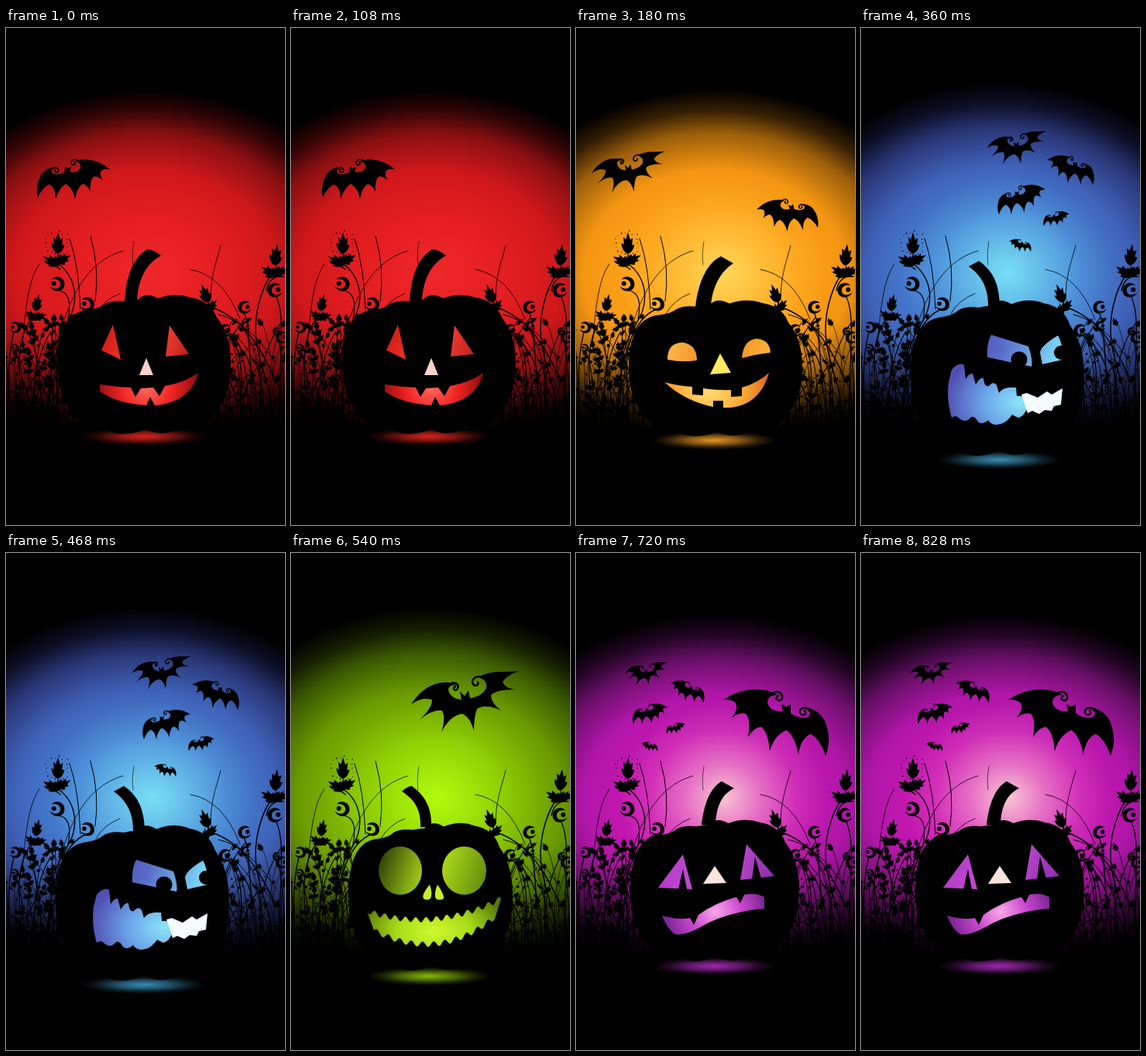
An HTML page that plays this animation: 360x640 px, repeating every 0.9 s.

```html
<!DOCTYPE html>
<html lang="en">
<head>
<meta charset="utf-8">
<title>Halloween lantern</title>
<style>
html, body { margin: 0; width: 100%; height: 100%; overflow: hidden; background: #000; }
svg { display: block; width: 100%; height: 100%; }
</style>
</head>
<body>
<svg id="stage" viewBox="0 0 360 640"></svg>
<script>
const HOLD = 180;
const stage = document.getElementById('stage');

let seed = 11;
const rnd = (a, b) => {
  seed = (seed * 16807) % 2147483647;
  return a + (b - a) * seed / 2147483647;
};
const fix = n => n.toFixed(1);
const fill = (d, f = '#000') => `<path d="${d}" fill="${f}"/>`;
const line = (d, w) => `<path d="${d}" fill="none" stroke="#000" stroke-width="${w}" stroke-linecap="round"/>`;
const dot = (x, y, r) => `<circle cx="${fix(x)}" cy="${fix(y)}" r="${fix(r)}"/>`;
const stops = list => list.map(([o, c, a = 1]) =>
  `<stop offset="${o}" stop-color="${c}" stop-opacity="${a}"/>`).join('');
const radial = (id, x, y, rx, ry, list) =>
  `<radialGradient id="${id}" gradientUnits="userSpaceOnUse" cx="0" cy="0" r="1" gradientTransform="translate(${x} ${y}) scale(${rx} ${ry})">${stops(list)}</radialGradient>`;
const linear = (id, x1, y1, x2, y2, list) =>
  `<linearGradient id="${id}" gradientUnits="userSpaceOnUse" x1="${x1}" y1="${y1}" x2="${x2}" y2="${y2}">${stops(list)}</linearGradient>`;

// ---- plants ----
const LEAF = 'M0 0Q-.9 -.12 -1 -.5L-.6 -.45L-.7 -.78L-.3 -.68L0 -1L.35 -.66L.75 -.74L.62 -.42L1 -.42Q.8 -.1 0 0Z';
const leaf = (x, y, len, ang, w) =>
  `<path transform="translate(${fix(x)} ${fix(y)}) rotate(${fix(ang)}) scale(${fix(w)} ${fix(len)})" d="${LEAF}"/>`;
const sprig = (x, y, s, ang = 0) =>
  leaf(x, y + 2 * s, 28 * s, ang, 8.5 * s) + leaf(x + s, y + 16 * s, 23 * s, ang - 62, 7.5 * s) +
  leaf(x - s, y + 13 * s, 20 * s, ang + 62, 7 * s) + leaf(x, y + 18 * s, 17 * s, ang, 4 * s);
const curl = (x, y, r, flip = 1) =>
  `<g transform="translate(${fix(x)} ${fix(y)}) scale(${fix(r * flip) / 9} ${fix(r) / 9})"><path d="M-7 -5C-1 -12 10 -7 9 2C8 11 -5 12 -9 3C-4 8 4 7 4 1C4 -5 -3 -6 -7 -5Z"/><circle cx="-4" cy="0" r="2.8"/></g>`;

function plants() {
  let s = '';
  const blades = [
    ['M82 271Q94 305 96 362', 1], ['M109 268Q121 310 115 352', 1], ['M151 287C112 298 82 335 66 410', .8],
    ['M165 275Q162 292 164 305', .6], ['M277 280C272 300 264 318 264 350', .8], ['M238 311Q280 318 302 375', .8],
    ['M43 304C28 325 25 365 21 410', .8], ['M147 342Q126 350 116 368', .8],
    ['M69 305C88 320 98 350 77 382S55 440 64 512', 1.4], ['M70 311C62 303 52 306 50 300', 1.3],
    ['M37 368C18 392 10 420 24 512', 1.3], ['M104 362C78 372 57 410 51 512', 1.4],
    ['M10 392Q-2 440 8 512', 1.3], ['M67 338Q87 340 80 375', 1.2],
    ['M342 318C330 335 317 372 324 410S346 470 342 512', 1.5], ['M266 360C300 372 324 400 346 450', 1.4],
    ['M307 366C318 390 310 430 326 512', 1.3], ['M283 394C304 406 308 445 300 512', 1.3],
    ['M348 345C362 370 352 430 352 512', 1.3], ['M274 369Q314 378 348 432', 1], ['M358 320Q340 318 336 338', 1.3]
  ];
  for (const [d, w] of blades) s += line(d, w);
  s += sprig(67, 289, 1) + sprig(38, 363, .8, 12) + sprig(347, 304, 1, 6) + sprig(261, 352, .9, -20);
  s += curl(66, 329, 9.5) + curl(105, 355, 9) + curl(12, 385, 7.5) + curl(347, 337, 9.5, -1) +
       curl(308, 359, 8.5, -1) + curl(283, 389, 8.5, -1) + curl(356, 398, 8, -1);
  for (let i = 0; i < 18; i++) {
    const a = i / 18 * 6.28, r = rnd(13, 18);
    s += dot(66 + Math.cos(a) * r, 277 + Math.sin(a) * r, rnd(.4, 1));
  }
  for (let i = 0; i < 130; i++) {
    const right = i % 2, x = right ? rnd(268, 362) : rnd(-2, 88);
    const h = 20 + 125 * rnd(0, 1) ** 1.5, lean = rnd(-32, 32), y = 514 - h, tx = x + lean;
    s += line(`M${fix(x)} 514Q${fix(x - lean * .5)} ${fix(y + h * .4)} ${fix(tx)} ${fix(y)}`, fix(rnd(.5, 1.3)));
    if (i % 7 === 0) s += curl(tx, y, rnd(4, 7), right ? -1 : 1);
    else if (i % 4 === 0) s += sprig(tx, y, rnd(.3, .5), lean);
    else s += leaf(tx, y + 5, rnd(6, 13), lean * 2, rnd(2, 4));
  }
  for (let i = 0; i < 230; i++) {
    const x = i % 2 ? rnd(290, 360) : rnd(0, 72);
    s += dot(x, 514 - 105 * rnd(0, 1) ** 1.4, rnd(.4, 2.2));
  }
  return s;
}

// ---- bats: each silhouette is placed by its two wing tips ----
const BATS = {
  swept: {
    a: [155, 195], b: [294, 152],
    d: 'M155 195Q170 171 193 167Q207 165 215 171Q204 168 203 176Q205 187 220 189L218 178L224 184L229 177L231 187Q246 185 252 174Q254 164 242 160Q251 154 266 153Q282 153 294 152Q279 157 273 166Q276 174 290 176Q266 175 258 183Q258 193 271 203Q250 193 240 201Q236 211 236 229Q231 211 221 207Q205 209 194 231Q200 212 195 203Q182 201 166 215Q183 198 182 189Q170 184 155 195Z',
    curls: 'M206 168C214 165 218 171 214 176C210 178 208 173 212 172M250 162C243 156 234 160 234 167C236 173 243 171 241 166'
  },
  arched: {
    a: [190, 189], b: [322, 261],
    d: 'M190 189Q212 174 237 176Q251 177 260 183Q247 182 247 193Q251 205 267 204L265 194L271 198L277 195L277 206Q289 215 300 211Q306 203 294 198Q313 201 321 216Q331 240 322 261Q315 240 303 233Q290 238 287 260Q282 234 271 228Q255 236 250 255Q248 231 239 224Q230 224 222 237Q226 214 219 207Q211 205 201 212Q210 201 206 193Q199 188 190 189Z',
    curls: 'M254 180C262 176 269 183 265 189C260 192 256 186 261 184M301 203C296 196 288 200 289 206C292 211 299 207 295 203'
  }
};
function bat(kind, x1, y1, x2, y2, flip) {
  const { a, b, d, curls } = BATS[kind];
  const f = flip ? -1 : 1;
  const dx = b[0] - a[0], dy = (b[1] - a[1]) * f, n = dx * dx + dy * dy;
  const ex = x2 - x1, ey = y2 - y1;
  const p = (ex * dx + ey * dy) / n, q = (ey * dx - ex * dy) / n;
  const m = [p, q, -q * f, p * f];
  const tx = x1 - m[0] * a[0] - m[2] * a[1], ty = y1 - m[1] * a[0] - m[3] * a[1];
  return `<g transform="matrix(${[...m, tx, ty].join(' ')})">${fill(d)}${line(curls, 2.4)}</g>`;
}

// ---- pumpkin ----
const BODY = 'M103 512Q66 490 66 430Q67 366 106 363Q121 361 128 355Q138 350 154 352Q164 350 170 350Q180 339 196 348Q218 340 238 347Q264 351 272 373Q290 395 290 432Q290 490 250 514Q236 522 220 519Q200 527 180 518Q150 529 130 519Q112 520 103 512Z';
function body([x0, y0, x1, y1]) {
  const sx = (x1 - x0) / 224, sy = (y1 - y0) / 180;
  return `<path transform="matrix(${sx} 0 0 ${sy} ${x0 - 66 * sx} ${y0 - 343 * sy})" d="${BODY}"/>`;
}
const curve = (p, t) => [0, 1].map(k =>
  p[0][k] * (1 - t) ** 2 + 2 * p[1][k] * t * (1 - t) + p[2][k] * t * t);
function jagged() {
  const top = [[98, 461], [184, 490], [271, 445]], low = [[264, 468], [190, 529], [107, 486]];
  const edge = (p, teeth) => Array.from({ length: 91 }, (_, i) => {
    const [x, y] = curve(p, i / 90);
    return fix(x) + ' ' + fix(y + 3.5 * Math.sin(i / 90 * teeth * 6.283));
  });
  return 'M' + [...edge(top, 13), ...edge(low, 11)].join('L') + 'Z';
}

const SCENES = [
  {
    sky: ['#e92226', '#e21c20', '#cf181b', '#8a1012', '#340506'], hot: ['#f12c2e', .5], fade: 245,
    glow: ['#f02820', 526], box: [66, 343, 290, 522],
    bats: [['arched', 134, 182, 41, 218, 1]],
    stem: 'M153 353C155 320 163 297 182 285Q190 285 200 293C182 303 170 322 169 353Z',
    light: ['#ff6a60', '#f02423', '#8c0c0c', 182, 462, 66, 66],
    lit: 'M121 459Q140 462 161 463L167 475L174 464L190 463L198 474L205 461Q230 457 248 444Q243 466 222 478Q207 485 192 486L186 475L181 486Q142 483 121 468Z',
    eyes: 'M138 382L123 415L148 427ZM211 383L206 423L236 420Z', tint: ['#c8100c', '#ff4a3c', '#a80e0e'],
    nose: ['M181 425L172 447L190 447Z', '#f8d0cc']
  },
  {
    sky: ['#ffb228', '#ffa319', '#f39512', '#9c5f0a', '#362004'], hot: ['#ffdc60', .85], fade: 246,
    glow: ['#ffa628', 531], box: [68, 350, 292, 525],
    bats: [['swept', 20, 187, 115, 159], ['arched', 233, 234, 312, 257]],
    stem: 'M154 360C158 325 170 302 187 294L203 303C186 314 175 335 174 360Z',
    light: ['#ffdc70', '#ffb03c', '#d8681c', 172, 468, 80, 60],
    lit: 'M114 456Q132 461 150 462L150 472L164 473L164 464Q185 467 200 466L200 475L214 474L214 463Q235 457 249 444Q242 470 222 482Q207 490 190 489L190 480L177 480L177 488Q140 480 114 456Z',
    eyes: 'M118 427Q118 405 138 405Q156 408 156 428Q136 431 118 427ZM214 425Q216 401 234 400Q250 402 251 418Q232 420 214 425Z', tint: ['#ffc050', '#ee841c', '#ffb840'],
    nose: ['M186 419L173 446L200 444Z', '#ffe860']
  },
  {
    sky: ['#54a4e2', '#4784d4', '#3f62b8', '#2a3676', '#0d1028'], hot: ['#7ce4f6', .9], fade: 255,
    glow: ['#3f9cc8', 556], box: [64, 350, 288, 550],
    bats: [['swept', 162, 155, 239, 133], ['arched', 240, 170, 299, 202], ['arched', 238, 208, 178, 240, 1],
      ['arched', 269, 240, 236, 255, 1], ['arched', 191, 275, 219, 288]],
    stem: 'M164 360C165 335 155 318 139 307L152 300C170 312 179 330 179 360Z',
    light: ['#8ce4fa', '#6aa4e8', '#5350b4', 205, 482, 95, 70],
    lit: 'M117 440Q126 430 133 434L135 452Q140 444 144 445L148 459Q154 449 158 451Q159 463 165 461Q171 454 175 460L178 470Q184 461 200 463L201 474Q214 472 215 488Q211 500 203 502L195 498Q186 511 174 511Q168 511 164 505Q156 512 151 507Q146 499 142 501Q135 510 126 502Q122 498 117 502Q110 478 113 456Z',
    eyes: 'M168 395L216 410Q222 428 220 436L163 424Q162 406 168 395ZM254 396Q232 409 231 418L234 433L260 427Q261 407 254 396Z', tint: ['#4a3ca8', '#5a6cc8', '#7cdcf8'],
    nose: ['M207 472L214 470L228 476L240 468L246 472L260 464L258 485L249 487L246 493L237 492L230 497L221 493L215 496Z', '#f4fcff'],
    dark: dot(204, 427, 10.5) + dot(258, 418, 9)
  },
  {
    sky: ['#98dc02', '#86c202', '#6a9a02', '#3c5a02', '#141f02'], hot: ['#b4ff10', .85], fade: 255,
    glow: ['#92cc0c', 545], box: [74, 347, 286, 537],
    bats: [['swept', 155, 195, 294, 152]],
    stem: 'M167 353C168 331 160 318 143 307Q149 301 156 300C175 314 182 331 181 353Z',
    light: ['#d0f830', '#a8dc18', '#587808', 184, 487, 95, 60],
    lit: jagged(),
    eyes: 'M113 409A28 31 0 1 1 169 409A28 31 0 1 1 113 409ZM195 409A28.5 31 0 1 1 252 409A28.5 31 0 1 1 195 409Z', tint: ['#2c3c06', '#b4e41c', '#648a0c'],
    nose: ['M179 427Q168 440 171 445Q175 448 180 445Q183 439 179 427ZM189 427Q198 440 197 445Q192 448 187 445Q184 439 189 427Z', '#c4ee2c']
  },
  {
    sky: ['#dc20bc', '#cc18b4', '#b016a8', '#681068', '#240626'], hot: ['#fbd8d4', .9], fade: 246,
    glow: ['#b02cc0', 532], box: [70, 343, 288, 525],
    bats: [['arched', 190, 189, 322, 261], ['swept', 63, 155, 118, 141], ['arched', 122, 168, 164, 193],
      ['arched', 118, 199, 74, 220, 1], ['arched', 141, 221, 117, 233, 1], ['arched', 84, 246, 105, 255]],
    stem: 'M162 350C165 325 172 303 188 294L204 303C188 311 181 326 180 350Z',
    light: ['#f8a8e8', '#cc48d0', '#782494', 180, 462, 66, 60],
    lit: 'M111 467Q132 473 147 470L152 479L158 466Q180 450 207 443L212 451L217 440Q232 437 243 443L243 458Q225 459 210 463Q182 469 160 482Q140 493 128 491Q118 485 111 467Z',
    eyes: 'M138 388L106 431L150 433ZM220 375L212 421L256 416Z', tint: ['#b43cc8', '#c850d4', '#8c2cac'],
    nose: ['M179 403L164 426L194 425Z', '#fbe4dc'],
    dark: fill('M138 407L132 433L143 433ZM231 391L227 421L239 419Z')
  }
];

function scene(s, i) {
  const [c0, c1, c2, c3, c4] = s.sky, [hot, ha] = s.hot, [gc, gy] = s.glow;
  const [l0, l1, l2, lx, ly, lrx, lry] = s.light, u = n => `url(#${n}${i})`;
  const [, , ex] = s.box;
  return `<g class="scene"><defs>` +
    radial('sky' + i, 180, 320, 306, s.fade, [[0, c0], [.32, c1], [.56, c2], [.75, c3], [.87, c4], [.98, '#000']]) +
    radial('hot' + i, 190, 315, 135, 125, [[0, hot, ha], [.35, hot, ha * .5], [.7, hot, ha * .13], [1, hot, 0]]) +
    radial('glow' + i, 178, gy, 80, 12, [[0, gc, .9], [.4, gc, .55], [.75, gc, .17], [1, gc, 0]]) +
    radial('lit' + i, lx, ly, lrx, lry, [[0, l0], [.5, l1], [1, l2]]) +
    linear('eye' + i, 115, 385, ex - 35, 430, s.tint.map((c, k) => [k / 2, c])) +
    `</defs><rect width="360" height="516" fill="${u('sky')}"/><rect width="360" height="516" fill="${u('hot')}"/>` +
    `<rect y="380" width="360" height="136" fill="url(#dusk)"/><use href="#plants"/><rect y="513" width="360" height="127"/>` +
    s.bats.map(b => bat(...b)).join('') +
    `<ellipse cx="178" cy="${gy}" rx="80" ry="12" fill="${u('glow')}"/>` +
    body(s.box) + fill(s.stem) + fill(s.lit, u('lit')) + fill(s.eyes, u('eye')) + fill(...s.nose) + (s.dark || '') + `</g>`;
}

stage.innerHTML = `<defs>` +
  linear('dusk', 0, 380, 0, 514, [[0, '#000', 0], [.4, '#000', .17], [.75, '#000', .55], [1, '#000', .95]]) +
  `<g id="plants">${plants()}</g></defs><rect width="360" height="640"/>` + SCENES.map(scene).join('');

const groups = [...stage.querySelectorAll('.scene')];
function draw(ms) {
  const now = Math.floor(ms / HOLD) % groups.length;
  groups.forEach((g, i) => g.setAttribute('display', i === now ? 'inline' : 'none'));
}
const start = performance.now();
function tick() {
  draw(performance.now() - start);
  requestAnimationFrame(tick);
}
tick();
</script>
</body>
</html>
```
